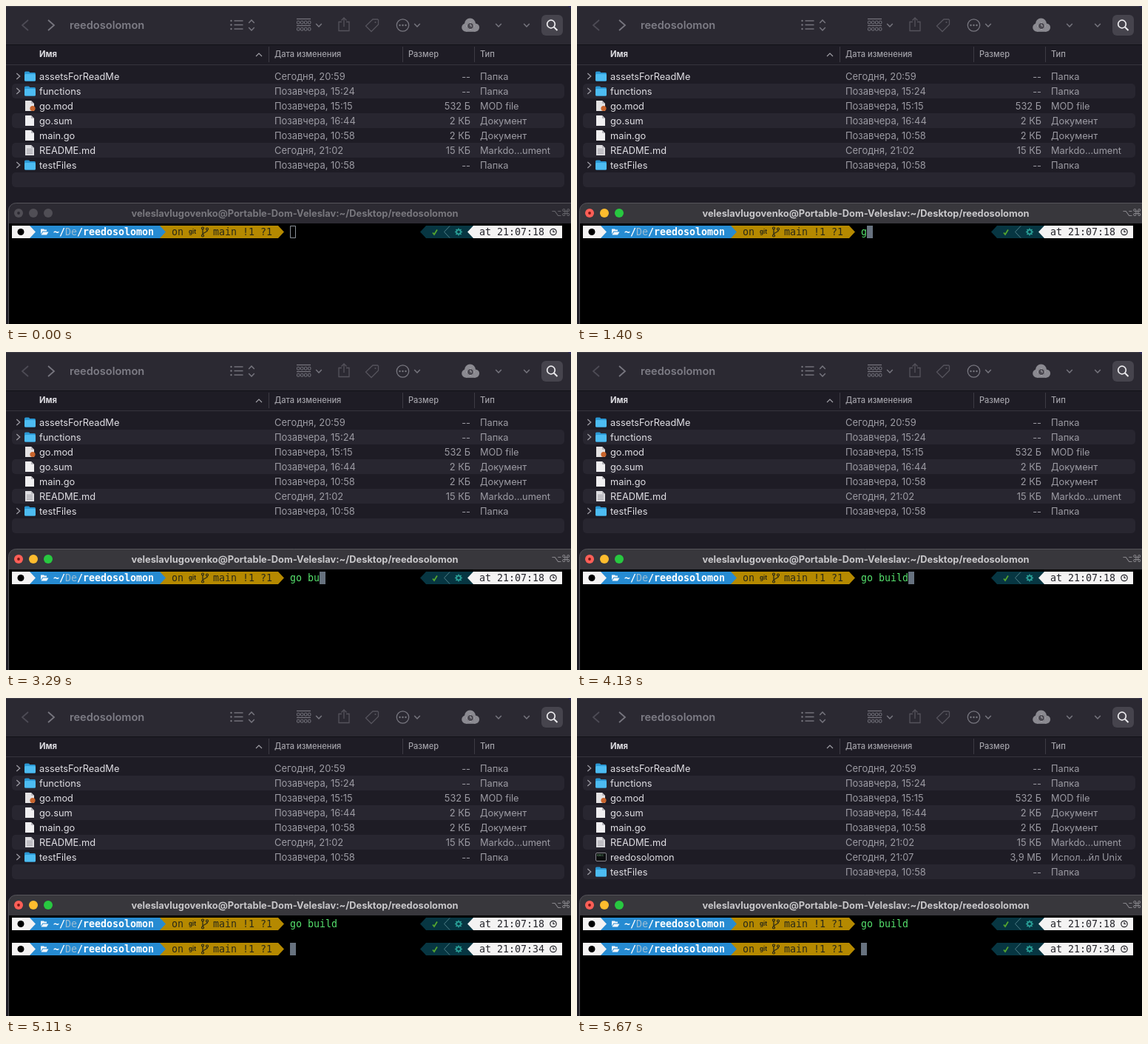
Write an HTML page with a canvas that moves like this. It is 764x430 px and loops after 5.81 s.

```html
<!DOCTYPE html>
<html lang="ru">
<head>
<meta charset="utf-8">
<title>go build</title>
<style>
  html, body { margin: 0; width: 100%; height: 100%; overflow: hidden; background: #1e1c25; }
  canvas { display: block; }
</style>
</head>
<body>
<canvas id="stage" width="764" height="430"></canvas>
<script>
const ctx = document.getElementById('stage').getContext('2d');
const LOOP = 5810, TICK = 70;
const SANS = 'Inter, "Noto Sans", sans-serif';
const MONO = '13.29px "DejaVu Sans Mono", monospace';
const DIM = '#9c9ba3', ICON = '#77767f', FAINT = '#55535c';

const FOCUS = 420, ENTER = 4830, DONE = 5110;
const COMMAND = 'go build';
const KEYS = [980, 2240, 2380, 2800, 3290, 3570, 3850, 4130];
const SLIDE = { start: 5310, length: 350 };
const TITLE = 'veleslavlugovenko@Portable-Dom-Veleslav:~/Desktop/reedosolomon';

const FILES = [
  ['folder', 'assetsForReadMe', 'Сегодня, 20:59', '--', 'Папка'],
  ['folder', 'functions', 'Позавчера, 15:24', '--', 'Папка'],
  ['media', 'go.mod', 'Позавчера, 15:15', '532 Б', 'MOD file'],
  ['page', 'go.sum', 'Позавчера, 16:44', '2 КБ', 'Документ'],
  ['page', 'main.go', 'Позавчера, 10:58', '2 КБ', 'Документ'],
  ['notes', 'README.md', 'Сегодня, 21:02', '15 КБ', 'Markdo...ument']
];
const BINARY = ['exec', 'reedosolomon', 'Сегодня, 21:07', '3,9 МБ', 'Испол...йл Unix'];
const TESTS = ['folder', 'testFiles', 'Позавчера, 10:58', '--', 'Папка'];

function text(str, x, y, color, font, align = 'left') {
  ctx.font = font;
  ctx.fillStyle = color;
  ctx.textAlign = align;
  ctx.fillText(str, x, y);
}

function rect(x, y, w, h, color) {
  ctx.fillStyle = color;
  ctx.fillRect(x, y, w, h);
}

function round(x, y, w, h, r, fill, stroke) {
  ctx.beginPath();
  ctx.roundRect(x, y, w, h, r);
  paint(fill, stroke);
}

function paint(fill, stroke, width = 1) {
  if (fill) { ctx.fillStyle = fill; ctx.fill(); }
  if (stroke) { ctx.strokeStyle = stroke; ctx.lineWidth = width; ctx.stroke(); }
}

function disc(x, y, r, fill, stroke, width) {
  ctx.beginPath();
  ctx.arc(x, y, r, 0, Math.PI * 2);
  paint(fill, stroke, width);
}

// Points are a flat list: x, y, x, y...
function trace(pts) {
  ctx.beginPath();
  for (let i = 0; i < pts.length; i += 2) ctx.lineTo(pts[i], pts[i + 1]);
}

function line(pts, color, width = 1.4) {
  trace(pts);
  paint(null, color, width);
}

function poly(pts, color) {
  trace(pts);
  paint(color);
}

function chevron(x, y, dx, dy, color, width) {
  const flat = Math.abs(dx) > Math.abs(dy);
  line(flat ? [x - dx, y - dy, x, y + dy, x + dx, y - dy]
            : [x - dx, y - dy, x + dx, y, x - dx, y + dy], color, width);
}

function clock(x, y, r, color, width) {
  disc(x, y, r, null, color, width);
  line([x, y - r * 0.6, x, y, x + r * 0.5, y], color, width);
}

function toolbar() {
  rect(0, 0, 764, 52, '#2b2932');
  rect(0, 0, 764, 1, '#403e48');
  poly([760, 0, 764, 0, 764, 4], '#2c2858');
  rect(0, 52, 764, 1, '#111016');

  chevron(26, 26, -4, 7, '#4d4b55', 1.8);
  chevron(61, 26, 4, 7, ICON, 1.8);
  text('reedosolomon', 86, 31, '#7d7c85', '600 14.6px ' + SANS);

  for (const y of [20, 25.5, 31]) {
    disc(304.5, y, 1.2, ICON);
    line([308.5, y, 320.5, y], ICON);
  }
  chevron(332, 21, 3.8, -2, ICON, 1.5);
  chevron(332, 31, 3.8, 2, ICON, 1.5);

  for (const y of [17.5, 26.5]) {
    line([393, y, 412, y], ICON, 1.2);
    for (let x = 393.5; x < 410; x += 5) round(x, y + 2.8, 3.4, 3.8, 1, null, ICON);
  }
  for (const x of [423, 556, 666, 704]) chevron(x, 26, 3.8, 2, ICON, 1.5);

  line([454, 21.5, 450, 21.5, 450, 33.5, 464, 33.5, 464, 21.5, 460, 21.5], FAINT, 1.3);
  line([457, 28, 457, 16], FAINT, 1.3);
  line([453.5, 19.5, 457, 16, 460.5, 19.5], FAINT, 1.3);

  line([496, 18, 502.5, 18, 503.5, 19, 503.5, 25, 494, 34.5, 486.5, 27, 496, 18, 499, 18], FAINT, 1.3);
  disc(499.5, 22, 1.1, FAINT);

  disc(536.5, 26, 8.2, null, ICON, 1.3);
  for (const dx of [-4, 0, 4]) disc(536.5 + dx, 26, 1.2, ICON);

  const cloud = '#8b8a91';
  disc(622, 29, 5.8, cloud);
  disc(627.5, 24, 7.5, cloud);
  disc(634.5, 29, 5.6, cloud);
  rect(622, 28, 13, 6.8, cloud);
  disc(628, 27, 5, '#4b4951');
  clock(628, 27, 4.6, '#a9a8ae', 1);

  round(724, 12, 29, 28, 6, '#46444d');
  disc(737, 24.5, 5.3, null, '#eeedf0', 1.7);
  line([741, 28.5, 745.5, 33], '#eeedf0', 2);
}

function columns() {
  const font = '500 11.1px ' + SANS;
  text('Имя', 45, 69, '#dddce1', '700 11.2px ' + SANS);
  text('Дата изменения', 363, 69, '#a3a2a9', font);
  text('Размер', 544, 69, '#a3a2a9', font);
  text('Тип', 641, 69, '#a3a2a9', font);
  chevron(342, 66, 4, -2, '#a3a2a9', 1.1);
  for (const x of [355, 536, 633]) rect(x, 55, 1, 21, '#3d3b44');
  rect(0, 79, 764, 1, '#36343d');
}

function sheet(cy, color) {
  poly([26, cy - 7, 34, cy - 7, 38, cy - 3, 38, cy + 7, 26, cy + 7], color);
  poly([34, cy - 7, 38, cy - 3, 34, cy - 3], '#b9b8bd');
}

const ICONS = {
  folder(cy) {
    chevron(16.5, cy, 2.2, 4, '#98979f', 1.4);
    round(25, cy - 6.5, 7, 5, 1.5, '#2b98d4');
    round(25, cy - 5, 15, 11.5, 1.5, '#2b98d4');
    round(25, cy - 3, 15, 9.5, 1.5, '#4dbcf2');
  },
  page(cy) { sheet(cy, '#f0eff1'); },
  notes(cy) {
    sheet(cy, '#dddce0');
    for (let y = cy - 2; y < cy + 6; y += 2) rect(28, y, 8, 1, '#a2a1a8');
  },
  media(cy) {
    sheet(cy, '#e4e2e3');
    disc(36, cy + 3.5, 3.6, '#c8642c');
  },
  exec(cy) {
    round(25.5, cy - 5.5, 14, 11, 1.5, '#0c0d0f', '#85848b');
    text('exec', 27, cy - 1.5, '#6fae78', '4px ' + SANS);
  }
};

function row([icon, name, date, size, type], cy) {
  const y = cy + 4.8, font = '12.8px ' + SANS;
  ICONS[icon](cy);
  text(name, 45, y, '#e0dfe4', font);
  text(date, 363, y, DIM, '12.95px ' + SANS);
  text(size, 628, y, DIM, font, 'right');
  text(type, 641, y, DIM, font);
}

function finder(t) {
  rect(0, 0, 764, 430, '#1e1c25');
  toolbar();
  columns();
  for (let y = 105; y < 240; y += 40) round(8, y, 747, 20, 5, '#282630');
  FILES.forEach((file, i) => row(file, 95 + i * 20));

  const p = Math.min(1, Math.max(0, (t - SLIDE.start) / SLIDE.length));
  const ease = (1 - Math.cos(Math.PI * p)) / 2;
  ctx.globalAlpha = Math.max(0, (p - 0.4) / 0.6);
  row(BINARY, 215);
  ctx.globalAlpha = 1;
  row(TESTS, 215 + 20 * ease);
}

function mono(str, x, top, color, bold) {
  text(str, x, top + 13, color, (bold ? 'bold ' : '') + MONO);
}

// A bar with an arrow tip of one cell; it points left when tip < flat.
function arrow(base, flat, tip, top, color) {
  poly([base, top, flat, top, tip, top + 8.5, flat, top + 17, base, top + 17], color);
}

function gear(x, y, color) {
  disc(x, y, 2.8, null, color, 1.7);
  for (let i = 0; i < 8; i++) {
    const a = i * Math.PI / 4, c = Math.cos(a), s = Math.sin(a);
    line([x + 3 * c, y + 3 * s, x + 5 * c, y + 5 * s], color, 1.5);
  }
}

function branch(x, y, color) {
  line([x, y - 4, x, y + 4], color, 1.3);
  line([x + 6, y - 3, x + 6, y - 1, x, y + 2.5], color, 1.3);
  for (const [dx, dy] of [[0, -5], [0, 5], [6, -4]]) disc(x + dx, y + dy, 1.5, null, color, 1.2);
}

function prompt(top, time) {
  const mid = top + 8.5, white = '#f4f3f3', ink = '#2b2a18', teal = '#073642';
  arrow(208, 368, 376, top, '#b58900');
  arrow(32, 208, 216, top, '#268bd2');
  arrow(8, 32, 40, top, white);
  disc(20, mid, 4.5, '#000');

  poly([47, mid - 4, 51, mid - 4, 52, mid - 3, 55, mid - 3, 55, mid - 1, 49.5, mid - 1, 47, mid + 3], '#f4f8fb');
  poly([50, mid, 57.5, mid, 55, mid + 4, 47.5, mid + 4], '#f4f8fb');
  mono('~/', 64, top, '#fff', true);
  mono('De', 80, top, '#9cbdd4');
  mono('/reedosolomon', 96, top, '#fff', true);

  mono('on', 224, top, ink);
  text('git', 247, top + 11, ink, 'bold 8px ' + SANS);
  branch(266, mid, ink);
  mono('main !1 ?1', 280, top, ink);

  arrow(632, 568, 560, top, teal);
  line([577, mid + 1, 579, mid + 3.5, 583, mid - 3], '#55a630', 1.8);
  line([600, top + 0.5, 592.5, mid, 600, top + 16.5], '#4f7f88', 1);
  gear(612, mid, '#2aa198');
  arrow(752, 632, 624, top, white);
  mono('at ' + time, 640, top, '#24242a');
  clock(740, mid, 4.2, '#24242a', 1.2);
}

function terminal(t) {
  const active = t >= FOCUS, running = t >= ENTER && t < DONE;
  round(3.5, 266.5, 800, 200, 10, active ? '#38373c' : '#2c2a32', '#56555b');
  rect(4, 294, 760, 136, '#000');

  ['#ff5f57', '#febc2e', '#28c840'].forEach((color, i) =>
    disc(17 + i * 20, 280, 6, active ? color : '#504e55'));
  disc(17, 280, 1.9, active ? '#7d1512' : '#2c2a32');

  text(running ? COMMAND : TITLE, 390.5, 284.5, active ? '#c9c8cb' : '#78777d',
    '700 12.85px ' + SANS, 'center');
  const hint = active ? '#8a898e' : '#67666c';
  text('⌥', 737.5, 284, hint, '12px "DejaVu Sans", sans-serif');
  text('⌘1', 750.5, 284, hint, '13px "DejaVu Sans", sans-serif');

  const typed = KEYS.filter(k => t >= k).length;
  prompt(297, '21:07:18');
  mono(COMMAND.slice(0, typed), 384, 297, '#55e06c');

  let x = 384 + typed * 8, y = 297;
  if (running) [x, y] = [8, 314];
  if (t >= DONE) {
    prompt(331, '21:07:34');
    [x, y] = [384, 331];
  }
  if (active) rect(x, y, 8, 17, '#67727f');
  else round(x + 0.5, y + 0.5, 7, 16, 0, null, '#8a9098');
}

function draw(now) {
  const t = Math.floor((now % LOOP) / TICK) * TICK;
  finder(t);
  terminal(t);
}

let start;
function tick(now) {
  start ??= now;
  draw(now - start);
  requestAnimationFrame(tick);
}
draw(0);
requestAnimationFrame(tick);
</script>
</body>
</html>
```
